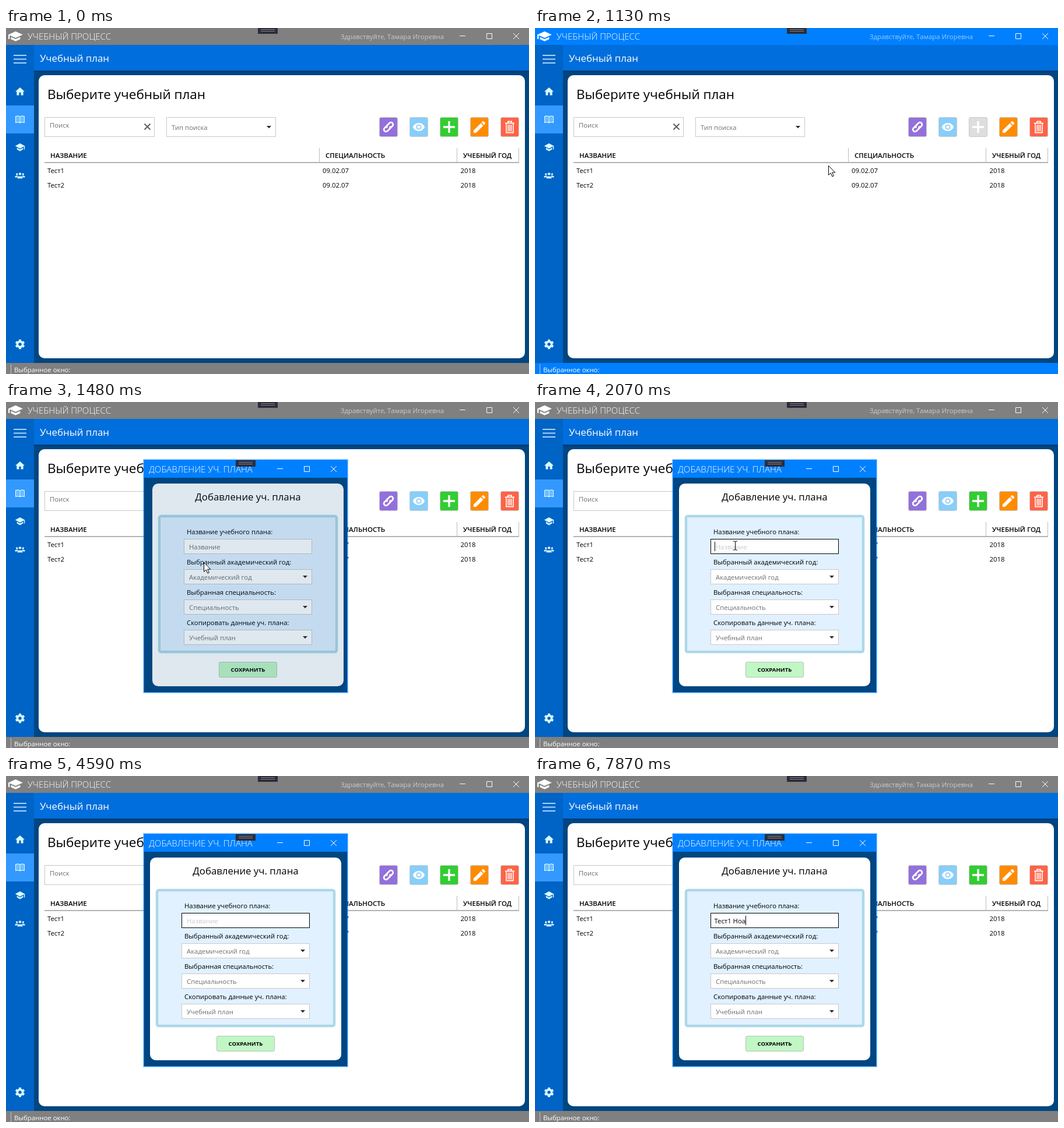
An HTML page that plays this animation: 897 px wide and 594 px high, repeating every 8 s.

```html
<!DOCTYPE html>
<html lang="ru">
<head>
<meta charset="utf-8">
<title>Учебный процесс</title>
<style>
  html, body { margin: 0; width: 100%; height: 100%; overflow: hidden; background: #004680; }
  svg { display: block; width: 897px; height: 594px; }
  text { font: 11.35px "Open Sans", "Noto Sans", sans-serif; white-space: pre; }
  .light { font-size: 15.1px; font-weight: 300; }
  .head { font-size: 11.5px; font-weight: 600; }
</style>
</head>
<body>
<svg id="stage" viewBox="0 0 897 594"></svg>
<script>
const LOOP = 8000;
const OPEN = 1190;

const rect = (x, y, w, h, fill, more = '') =>
  `<rect x="${x}" y="${y}" width="${w}" height="${h}" fill="${fill}" ${more}/>`;
const line = (d, color, width = 1, more = '') =>
  `<path d="${d}" fill="none" stroke="${color}" stroke-width="${width}" ${more}/>`;
const shape = (d, fill, more = '') => `<path d="${d}" fill="${fill}" ${more}/>`;
const label = (x, y, str, fill = '#000', more = '') =>
  `<text x="${x}" y="${y}" fill="${fill}" ${more}>${str}</text>`;
const size = px => `style="font-size:${px}px"`;
const at = (x, y, inner, more = '') => `<g transform="translate(${x} ${y}) ${more}">${inner}</g>`;

const box = (x, y, w, h, more = '') =>
  rect(x + .5, y + .5, w - 1, h - 1, '#fff', `stroke="#c8c8c8" ${more}`);
const arrow = (x, y) => shape(`M${x} ${y}h8l-4 4.2z`, '#302830');

// Minimise, maximise and close signs
const controls = (x, y) => line(
  `M${x} ${y + .5}h10M${x + 46.5} ${y - 3.5}h9v9h-9zM${x + 92} ${y - 4}l10 10m0-10l-10 10`, '#fff');

const grip = (x, y, h) => rect(x, y, 34, h, '#2d2d3a') +
  line(`M${x + 5} ${y + h - 7.5}h24m-24 3h24`, '#85858f');

const CAP = 'M12 3L1 9l11 6 9-4.91V17h2V9M5 13.18v4L12 21l7-3.82v-4L12 17z';
const HOME = 'M10 20v-6h4v6h5v-8h3L12 3 2 12h3v8z';
const EYE = 'M12 9a3 3 0 1 0 0 6a3 3 0 1 0 0-6M12 17a5 5 0 1 1 0-10a5 5 0 1 1 0 10' +
  'M12 4.5C7 4.5 2.73 7.61 1 12c1.73 4.39 6 7.5 11 7.5s9.27-3.11 11-7.5C21.27 7.61 17 4.5 12 4.5z';
const PENCIL = 'M20.7 7a1 1 0 0 0 0-1.4l-2.3-2.3a1 1 0 0 0-1.4 0l-1.9 1.8 3.8 3.8M3 17.25V21h3.75L17.8 9.9 14.1 6.2z';
const PALE = '#d8fbff';

function gear() {
  let teeth = '';
  for (let a = 0; a < 360; a += 60)
    teeth += rect(-2, -8.2, 4, 4, PALE, `transform="rotate(${a})"`);
  return teeth + `<circle r="4.6" fill="none" stroke="${PALE}" stroke-width="3.6"/>`;
}

function people() {
  const person = (x, y, r) => `<circle cx="${x}" cy="${y}" r="${r}" fill="${PALE}"/>` +
    shape(`M${x - r * 1.9} ${y + r * 3.3}v-${r * .8}q0-${r} ${r * 1.9}-${r}t${r * 1.9} ${r}v${r * .8}z`, PALE);
  return person(-5.3, -2, 1.7) + person(5.3, -2, 1.7) +
    `<g stroke="#0063c6" stroke-width=".7">${person(0, -2.6, 2.5)}</g>`;
}

const book = line('M0-4.5Q-3.5-6.8-7.3-5V5.2Q-3.5 3.6 0 5.6Q3.5 3.6 7.3 5.2V-5Q3.5-6.8 0-4.5V5.6', PALE, 1.4) +
  line('M-5.6-2.8q2-.6 4 .2m-4 2.2q2-.6 4 .2m-4 2.2q2-.6 4 .2M5.6-2.8q-2-.6-4 .2m4 2.2q-2-.6-4 .2m4 2.2q-2-.6-4 .2', PALE);

const chain = `<g transform="rotate(-45)" fill="none" stroke="#fff" stroke-width="2.7">
  <path d="M1.5-3.6H-6a3.6 3.6 0 0 0 0 7.2H-1a3.6 3.6 0 0 0 3.5-3"/>
  <path d="M-1.5 3.6H6a3.6 3.6 0 0 0 0-7.2H1a3.6 3.6 0 0 0-3.5 3"/></g>`;

const trash = line('M-8-6.6H8M-3-7v-2.6h6V-7', '#fff', 1.8) +
  line('M-6-6V9.6H6V-6M-2.7-4V7.5M0-4V7.5M2.7-4V7.5', '#fff', 1.6);

const icon24 = (d, scale) =>
  shape(d, '#fff', `fill-rule="evenodd" transform="scale(${scale}) translate(-12 -12)"`);

const tools = [
  ['#9370db', chain],
  ['#87cefa', icon24(EYE, .92)],
  ['#32cd32', line('M-10 0H10M0-10V10', '#fff', 3.4)],
  ['#ff8c00', icon24(PENCIL, 1.12)],
  ['#ff6347', trash]
].map(([color, sign], i) => at(656 + 52 * i, 170,
  rect(-15.5, -16.5, 31, 33, color, `rx="2.5" stroke="#c9c9c9" ${i === 2 ? 'id="plus"' : ''}`) + sign)).join('');

const rows = ['Тест1', 'Тест2'].map((name, i) => {
  const y = 249 + 25 * i;
  return label(71, y, name) + label(543, y, '09.02.07') + label(779.5, y, '2018');
}).join('');

const page =
  rect(0, 0, 897, 594, '#004680') +
  rect(0, 0, 897, 29, '#808080', 'class="bar"') +
  rect(0, 575, 897, 19, '#808080', 'class="bar"') +
  rect(48, 29, 849, 44, '#006edc') +
  rect(48, 73, 849, 3, '#003a70', 'opacity=".6"') +
  rect(0, 29, 48, 546, '#0063c6') +
  rect(0, 133, 48, 48, '#3399ff') +
  shape(CAP, '#fff', 'transform="translate(30 3) scale(-1.13 .94)"') +
  label(37, 20, 'УЧЕБНЫЙ ПРОЦЕСС', '#fff', 'class="light"') +
  label(751, 19, 'Здравствуйте, Тамара Игоревна', '#fff', 'text-anchor="end" opacity=".58"') +
  controls(778, 13) + grip(432, 0, 10) +
  line('M13 47h22m-22 6.5h22m-22 6.5h22', '#a9d6f5', 2) +
  shape(HOME, PALE, 'transform="translate(14.4 99.6) scale(.8)"') +
  at(24, 157, book) +
  shape(CAP, PALE, 'transform="translate(15 195.7) scale(.75)"') +
  at(24, 253, people()) + at(24, 543, gear()) +
  label(58, 58, 'Учебный план', '#fff', size(16.9)) +
  rect(56, 81, 834, 486, '#fff', 'rx="10"') +
  label(71, 122, 'Выберите учебный план', '#000', size(22.5)) +
  box(66, 153, 189, 34) + label(75, 171, 'Поиск', '#707070') +
  line('M237.5 164.5l10 10m0-10l-10 10', '#606060', 2) +
  box(275, 153, 188, 34) + label(284, 175, 'Тип поиска', '#707070') + arrow(447, 168) +
  tools +
  line('M66 231H880', '#b3b3b3', 2) +
  line('M537.5 206v24M773.5 206v24M879.5 206v24', '#bdbdbd') +
  label(76, 223, 'НАЗВАНИЕ', '#000', 'class="head"') +
  label(548, 223, 'СПЕЦИАЛЬНОСТЬ', '#000', 'class="head"') +
  label(784, 223, 'УЧЕБНЫЙ ГОД', '#000', 'class="head"') +
  rows +
  line('M8.5 577V594', '#c4c4c4') +
  label(14, 591, 'Выбранное окно:', '#fff');

const combos = [
  ['Выбранный академический год:', 'Академический год'],
  ['Выбранная специальность:', 'Специальность'],
  ['Скопировать данные уч. плана:', 'Учебный план']
].map(([title, hint], i) => {
  const y = 287 + 52 * i;
  return label(306, y - 8, title) + box(301, y, 220, 26) +
    label(310, y + 18, hint, '#707070') + arrow(505, y + 11);
}).join('');

const form =
  rect(247, 140, 328, 348, '#fff', 'rx="10"') +
  label(411, 169, 'Добавление уч. плана', '#000', `text-anchor="middle" ${size(16.8)}`) +
  rect(259, 196, 304, 233, '#e1f1ff', 'rx="3" stroke="#add8e6" stroke-width="4.4"') +
  label(306, 227, 'Название учебного плана:') +
  box(301, 235, 220, 26, 'id="field"') +
  label(310, 253, 'Название', '#707070', 'id="hint"') +
  label(307.6, 253, '', '#000', 'id="typed"') +
  rect(308, 240, 1, 16, '#000', 'id="caret"') +
  combos +
  rect(361.5, 446.5, 99, 26, '#c1f7c4', 'rx="2.5" stroke="#b5c4b8"') +
  label(411, 463, 'СОХРАНИТЬ', '#000', 'text-anchor="middle" style="font-size:9.6px;font-weight:700"');

const dialog =
  `<g id="glow" fill="none" stroke="#0080ff">
    <rect x="234.5" y="97.5" width="353" height="403" rx="2" opacity=".12"/>
    <rect x="236" y="99" width="350" height="400" stroke-width="2" opacity=".22"/></g>
  <g id="dialog">` +
  rect(236, 99, 350, 400, '#004680') +
  rect(236, 99, 350, 31, '#0080ff') +
  label(245, 121, 'ДОБАВЛЕНИЕ УЧ. ПЛАНА', '#fff', 'class="light"') +
  controls(465, 114) + grip(394, 99, 12) +
  `<g clip-path="url(#inner)"><g id="form">${form}</g></g>` +
  rect(236.5, 99.5, 349, 399, 'none', 'stroke="#0080ff"') + '</g>';

const pointers =
  shape('M.5.5V16.5l3.7-3.5 2.6 6 2.5-1.1-2.6-5.8h5.1z', '#fff', 'stroke="#000" id="pointer"') +
  line('M-3.5-7.5h2.5q1 0 1 1V6.5q0 1-1 1h-2.5M3.5-7.5H1q-1 0-1 1V6.5q0 1 1 1h2.5', '#000', 1, 'id="beam"');

const stage = document.getElementById('stage');
stage.innerHTML = `<clipPath id="inner"><rect x="237" y="130" width="348" height="368"/></clipPath>` +
  page + dialog + pointers;
const el = id => document.getElementById(id);
const show = (node, on) => node.setAttribute('visibility', on ? 'visible' : 'hidden');
const [plus, glow, win, body, field, hint, typed, caret, pointer, beam] =
  ['plus', 'glow', 'dialog', 'form', 'field', 'hint', 'typed', 'caret', 'pointer', 'beam'].map(el);
const bars = stage.querySelectorAll('.bar');

// time, x, y
const path = [
  [60, 610, 576], [300, 642, 425], [480, 705, 232], [630, 757, 174], [850, 757, 174],
  [1000, 640, 200], [1130, 504, 236], [1250, 433, 260], [1360, 376, 271], [1480, 339, 275],
  [1660, 341, 262], [1770, 343, 248], [1960, 343, 246], [LOOP, 343, 246]
];

// time, text, caret hidden
const typing = [
  [0, '', 1], [1960, ''], [2460, '', 1], [2960, ''], [3130, 'N'], [3470, 'Nt'], [3530, 'Ntc'],
  [3810, 'Nt'], [3980, 'N'], [4090, ''], [4590, '', 1], [5090, ''], [5200, 'Те'], [5370, 'Тес'],
  [5480, 'Тест'], [5760, 'Тест '], [5930, 'Тест'], [6100, 'Тест1'], [6210, 'Тест1 '],
  [6760, 'Тест1 ', 1], [6980, 'Тест1 Н'], [7260, 'Тест1 Но'], [7540, 'Тест1 Н'],
  [7760, 'Тест1 Но'], [7870, 'Тест1 Ноа']
];

const clamp = v => Math.max(0, Math.min(1, v));

function place(t) {
  const i = Math.max(1, path.findIndex(p => p[0] > t));
  const [a, b] = [path[i - 1], path[i]];
  const k = clamp((t - a[0]) / (b[0] - a[0]));
  return [1, 2].map(n => Math.round(a[n] + (b[n] - a[n]) * k));
}

function drawPointer(t) {
  const [x, y] = place(t);
  const overField = t > 1600 && y < 261;
  show(pointer, t >= 60 && !overField);
  show(beam, overField && t < 3130);
  pointer.setAttribute('transform', `translate(${x} ${y})`);
  beam.setAttribute('transform', `translate(${x + .5} ${y + .5})`);
  field.setAttribute('stroke', overField ? '#000' : '#c8c8c8');
  plus.setAttribute('fill', t >= 590 && t < OPEN ? '#dedede' : '#32cd32');
}

function drawDialog(t) {
  const open = t >= OPEN;
  show(glow, open);
  win.setAttribute('display', open ? 'inline' : 'none');
  const grow = 1 - (1 - clamp((t - OPEN) / 200)) ** 3;
  const scale = .955 + .045 * grow;
  win.setAttribute('opacity', grow);
  win.setAttribute('transform', `translate(411 299) scale(${scale}) translate(-411 -299)`);
  const slide = t < 1770 ? 30 * Math.exp((1180 - t) / 149) : 0;
  body.setAttribute('transform', `translate(${slide})`);
  body.setAttribute('opacity', clamp((t - 1172) / 354));
}

function drawTyping(t) {
  const [, str, off] = typing.filter(s => s[0] <= t).pop();
  if (typed.textContent !== str) typed.textContent = str;
  hint.setAttribute('display', str ? 'none' : 'inline');
  hint.setAttribute('fill', t >= 1960 ? '#cccccc' : '#707070');
  caret.setAttribute('display', off ? 'none' : 'inline');
  caret.setAttribute('x', 308 + Math.floor(str ? typed.getComputedTextLength() : 0));
}

function draw(t) {
  const active = t >= 790 && t < OPEN;
  bars.forEach(b => b.setAttribute('fill', active ? '#0080ff' : '#808080'));
  drawPointer(t);
  drawDialog(t);
  drawTyping(t);
}

const start = performance.now();
function tick() {
  draw((performance.now() - start) % LOOP);
  requestAnimationFrame(tick);
}
tick();
</script>
</body>
</html>
```
